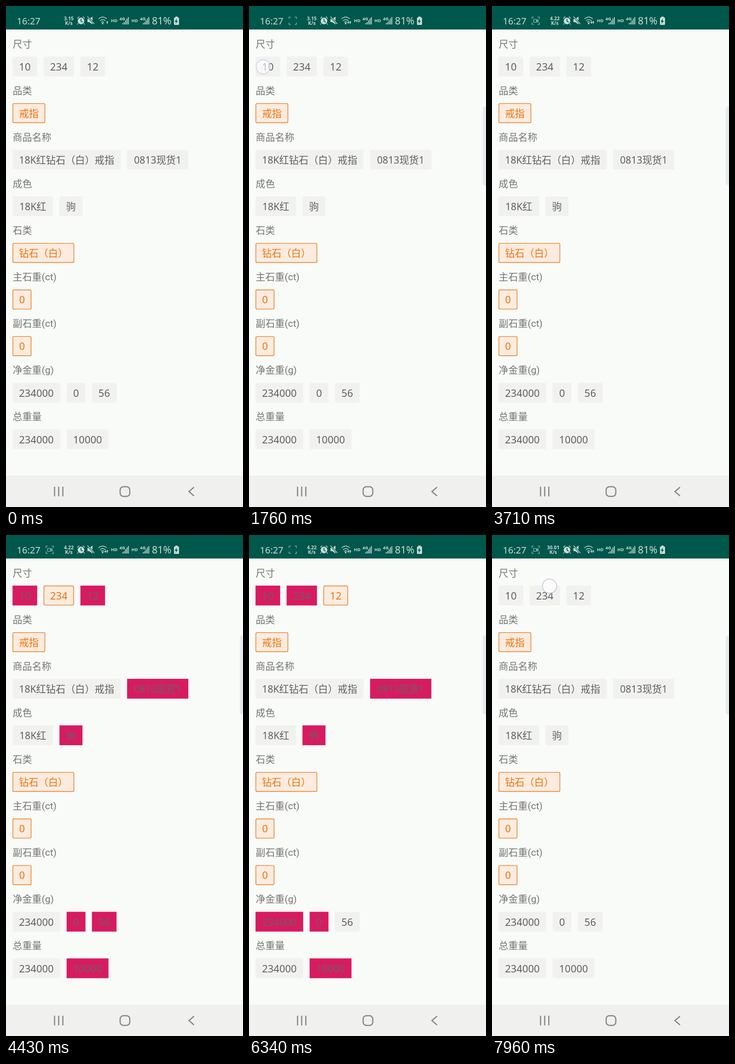
Write an HTML page that moves like this. It is 515x1087 px and loops after 7990 ms.

```html
<!DOCTYPE html>
<html lang="zh-CN">
<head>
<meta charset="utf-8">
<title>规格选择</title>
<style>
  html, body { margin: 0; width: 100%; height: 100%; overflow: hidden; background: #f9fbf8; }
  svg { display: block; width: 100vw; height: 100vh; }
  text { font-family: "Noto Sans", "Noto Sans CJK SC", "Noto Sans CJK", sans-serif; font-size: 21px; }
  .label { fill: #757575; font-family: Roboto, "Noto Sans CJK SC", "Noto Sans CJK", sans-serif; }
  .chip rect { fill: #f1f2f0; stroke: #f1f2f0; stroke-width: 1.4; rx: 2.5px; }
  .chip text { fill: #5f5f5f; font-size: 21.2px; text-anchor: middle; }
  .chip .latin { font-size: 22px; }
  .chip.on rect { fill: #fcebde; stroke: #e67a1c; }
  .chip.on text { fill: #ed720c; }
  .chip.off rect { fill: #d81b60; stroke: #d81b60; rx: 0; }
  .chip.off text { fill: #6b5f66; }
  .status { fill: #c8dcd9; }
  .status .small { font-size: 10.5px; font-weight: 600; }
  .status .tiny { font-size: 9.5px; font-weight: 700; }
  .line { fill: none; stroke: #c8dcd9; stroke-width: 1.5; }
  #record { stroke: #a5c6c1; stroke-width: 1.2; }
  .nav { fill: none; stroke: #858585; stroke-width: 2.5; }
</style>
</head>
<body>
<svg viewBox="0 0 515 1087">
  <rect width="515" height="1087" fill="#f9fbf8"/>
  <g id="form"></g>
  <rect id="handle" x="508" y="218" width="12" height="171" rx="4" fill="#e8e9ed"/>

  <rect width="515" height="51" fill="#00574b"/>
  <g class="status">
    <text x="23.5" y="39.5" style="font-size:20px">16:27</text>
    <g id="record" class="line">
      <path d="M87 28v-4h4M99 24h4v4M103 36v4h-4M91 40h-4v-4"/>
      <path id="camera" d="M90.5 29h6v6.5h-6zM97 32l3-2.5v5.5z"/>
    </g>
    <g text-anchor="middle">
      <text id="speed" class="small" y="30.5"></text>
      <text id="unit" class="small" y="41">K/s</text>
    </g>
    <circle cx="163" cy="32.5" r="7.2"/>
    <path class="line" d="M155 27l4-4M171 27l-4-4M157 38l-2 2M169 38l2 2" stroke-width="2"/>
    <path d="M163 28v5l3.5 2" fill="none" stroke="#00574b" stroke-width="1.8"/>
    <path d="M177 28h4l7-5v17l-7-5h-4z"/>
    <path d="M177 23l15 16" stroke="#00574b" stroke-width="4"/>
    <path class="line" d="M177 23l15 16"/>
    <path class="line" d="M201 28q9-8 18 0M204 32q6-5 12 0M207 35.5q3-2.5 6 0"/>
    <circle cx="210" cy="38" r="1.8"/>
    <path d="M220 32.5l2.5 3h-1.7v3h-1.6v-3h-1.7z"/>
    <path id="down" d="M216 38.5l2.5-3h-1.7v-3h-1.6v3h-1.7z"/>
    <g id="signals"></g>
    <text x="317" y="39.5" style="font-size:21.5px">81%</text>
    <path d="M368 23h5v2h1.500q1.500 0 1.500 1.500v13q0 1.500-1.500 1.500h-8q-1.500 0-1.500-1.500v-13q0-1.500 1.500-1.500h1.500z"/>
    <path d="M371.500 27l-5 7h3l-1 5 5-7h-3z" fill="#00574b"/>
  </g>

  <rect y="1019" width="515" height="68" fill="#f0f1ee"/>
  <g class="nav">
    <path d="M105.5 1043v21M114.500 1043v21M123.5 1043v21"/>
    <rect x="248" y="1043" width="21" height="21" rx="7"/>
    <path d="M408.5 1044l-11 9.5 11 9.5"/>
  </g>
  <circle id="touch" r="15.5" fill="#fdfdfd" stroke="#c4c4da" stroke-width="1.8"/>
</svg>
<script>
const LOOP = 7990, PITCH = 101.1, BORDER = 1.4;
const $ = id => document.getElementById(id);

function add(parent, tag, attrs, text = '') {
  const node = document.createElementNS('http://www.w3.org/2000/svg', tag);
  for (const key in attrs) node.setAttribute(key, attrs[key]);
  node.textContent = text;
  return parent.appendChild(node);
}

// Each row: label, then text and chip width pairs.
const rows = [
  ['尺寸', '10', 53.5, '234', 66, '12', 53.5],
  ['品类', '戒指', 71],
  ['商品名称', '18K红钻石（白）戒指', 235, '0813现货1', 133],
  ['成色', '18K红', 88, '驹', 50],
  ['石类', '钻石（白）', 134],
  ['主石重(ct)', '0', 41],
  ['副石重(ct)', '0', 41],
  ['净金重(g)', '234000', 103.5, '0', 41, '56', 53.5],
  ['总重量', '234000', 103.5, '10000', 91]
];
const chips = [];
rows.forEach(([label, ...items], row) => {
  const y = row * PITCH;
  add($('form'), 'text', { class: 'label', x: 14.5, y: y + 89.5 }, label);
  for (let i = 0, x = 14.2; i < items.length; i += 2) {
    const [text, width] = items.slice(i, i + 2);
    const chip = add($('form'), 'g', {});
    add(chip, 'rect', {
      x: x + BORDER / 2, y: y + 109.8 + BORDER / 2, width: width - BORDER, height: 43 - BORDER
    });
    add(chip, 'text', {
      x: x + width / 2, y: y + 139.8, class: /^\d+$/.test(text) ? 'latin' : ''
    }, text);
    chips.push(chip);
    x += width + 14;
  }
});

for (const x of [228, 272.5]) {
  add($('signals'), 'text', { class: 'tiny', x, y: 34.5 }, 'HD');
  add($('signals'), 'text', { class: 'tiny', x: x + 18.5, y: 31 }, '4G');
  for (let i = 0; i < 5; i++) {
    const height = [3, 5, 9, 13, 16][i];
    add($('signals'), 'rect', { x: x + 25 + i * 3, y: 40 - height, width: 1.7, height });
  }
}

// Selecting a size disables the chips that cannot be combined with it.
const FREE = { on: [3, 8, 9, 10], off: [] };
const TEN = { on: [0, 3, 8, 9, 10], off: [1, 2, 4, 6, 11, 13, 14] };
const LONG = { on: [1, 3, 8, 9, 10], off: [0, 2, 5, 7, 12, 13, 15] };
const TWELVE = { on: [2, 3, 8, 9, 10], off: [0, 1, 5, 7, 11, 12, 15] };
const states = [
  [0, FREE], [1820, TEN], [3620, FREE], [4220, LONG], [5130, FREE],
  [5660, TWELVE], [6580, FREE], [7180, LONG], [7640, FREE]
];
const speeds = [[0, '3.15'], [2730, '4.22'], [7110, '30.01']];
const blinks = [630, 1130, 1520, 1720, 2230, 2730, 3240, 3740, 4250, 4830, 5300, 5850, 6360, 6870, 7380];

// Touches: start, end, x, y, then an optional drag offset.
const touches = [
  [1720, 1850, 31, 132], [3490, 3640, 33, 132], [4090, 4260, 115, 132],
  [4980, 5170, 115, 132], [5500, 5690, 189, 132], [6420, 6610, 189, 132],
  [7050, 7210, 115, 132], [7500, 7670, 115, 132], [7850, 8100, 117, 130, 8, -19]
];

const clamp = v => Math.max(0, Math.min(1, v));
const latest = (list, t) => list.filter(([start]) => start <= t).pop()[1];

function drawTouch(t) {
  const touch = touches.find(([start, end]) => t >= start && t < end + 60);
  $('touch').setAttribute('opacity', 0);
  if (!touch) return;
  const [start, end, x, y, dx = 0, dy = 0] = touch;
  const drag = clamp((t - start) / 110);
  $('touch').setAttribute('cx', x + dx * drag);
  $('touch').setAttribute('cy', y + dy * drag);
  $('touch').setAttribute('opacity', 0.9 * Math.min(clamp((t - start) / 60), clamp((end + 60 - t) / 60)));
}

function draw(now) {
  const t = now % LOOP;
  const state = latest(states, t);
  chips.forEach((chip, i) => chip.setAttribute('class',
    'chip' + (state.on.includes(i) ? ' on' : state.off.includes(i) ? ' off' : '')));

  const speed = latest(speeds, t);
  const speedX = speed.length > 4 ? 133 : 136.5;
  $('speed').textContent = speed;
  $('speed').setAttribute('x', speedX);
  $('unit').setAttribute('x', speedX);

  $('record').setAttribute('opacity', +(t >= 300));
  $('down').setAttribute('opacity', +(t >= 300));
  $('camera').setAttribute('opacity', blinks.filter(b => b <= t).length % 2);
  $('handle').setAttribute('x', 515 - 7 * clamp((t - 200) / 300));
  drawTouch(t);
  requestAnimationFrame(() => draw(performance.now() - origin));
}

const origin = performance.now();
draw(0);
</script>
</body>
</html>
```
